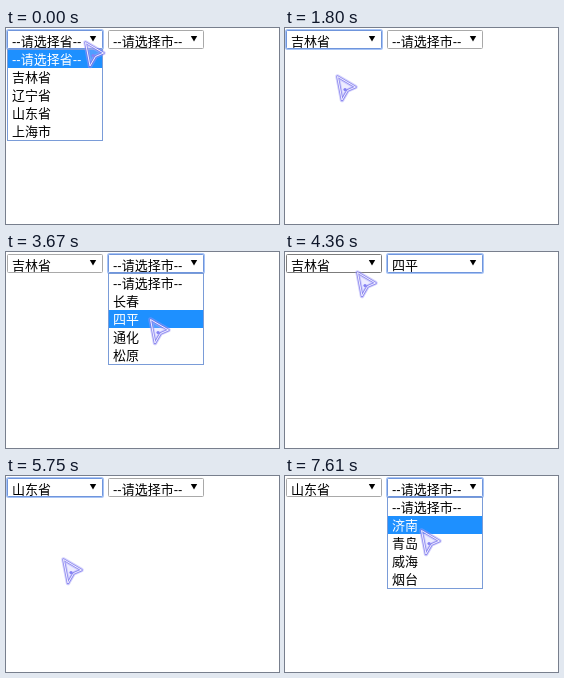
Animation of 273 by 196 pixels, one loop 7990 ms. Source, as an HTML page:

```html
<!DOCTYPE html>
<html lang="zh">
<head>
<meta charset="utf-8">
<style>
html, body { margin: 0; width: 100%; height: 100%; overflow: hidden; background: #fff; }
svg { display: block; width: 273px; height: 196px; }
text { font: 13px "Liberation Sans", "Noto Sans CJK SC", "Noto Sans CJK", sans-serif; white-space: pre; }
</style>
</head>
<body>
<svg viewBox="0 0 273 196">
  <defs><path id="arrow" d="M0 0L18 10.500L10 14L4.500 23.500Z"/></defs>
  <g id="ui"></g>
  <g id="cursor" fill="none" stroke-linejoin="round">
    <use href="#arrow" stroke="#a5a0f8" stroke-width="4.500" opacity=".45"/>
    <use href="#arrow" fill="#c4c0ff" fill-opacity=".3" stroke="#716cea" stroke-width="2.600" stroke-opacity=".7"/>
    <use href="#arrow" stroke="#f2f0ff" stroke-width="1"/>
    <circle cx="7.500" cy="13" r="1.600" fill="#8480f4"/>
  </g>
</svg>
<script>
const LOOP = 7990, STEP = 76.7, ROW = 18, LIST_TOP = 22, LEFT = [1, 102];
const provinces = ['--请选择省--', '吉林省', '辽宁省', '山东省', '上海市'];
const towns = { 吉林省: ['长春', '四平', '通化', '松原'], 山东省: ['济南', '青岛', '威海', '烟台'] };
const citiesOf = prov => ['--请选择市--', ...(towns[provinces[prov]] || [])];

// Each move eases the pointer to a new place in a few steps
const home = { x: 79, y: 14 };
const moves = [
  { at: 70, x: 51, y: 77, steps: 8 },
  { at: 1190, x: 52, y: 48, steps: 4 },
  { at: 2040, x: 144, y: 18, steps: 8 },
  { at: 2960, x: 144, y: 67, steps: 10 },
  { at: 3970, x: 66, y: 16, steps: 7 },
  { at: 4830, x: 63, y: 49, steps: 3 },
  { at: 5050, x: 57, y: 83, steps: 4 },
  { at: 5750, x: 135, y: 15, steps: 9 },
  { at: 6440, x: 137, y: 13, steps: 3 },
  { at: 7210, x: 136, y: 54, steps: 4 }
];
const clicks = [1800, 2660, 3970, 4600, 5750, 6830];

const ui = document.getElementById('ui');
const cursor = document.getElementById('cursor');
const ease = u => u * u * (3 - 2 * u);
const rowAt = y => Math.floor((y - LIST_TOP) / ROW);

function tipAt(t) {
  let { x, y } = home;
  for (const m of moves) {
    if (t < m.at) break;
    const k = Math.floor((t - m.at) / STEP + 0.2);
    const e = ease(Math.min(1, k / (m.steps - 1)));
    x += (m.x - x) * e;
    y += (m.y - y) * e;
  }
  return { x: Math.round(x), y: Math.round(y) };
}

// A click opens the box under the pointer, or picks a row of the open list
function stateAt(t) {
  const s = { picked: [0, 0], focus: 0, open: true };
  for (const at of clicks.filter(c => c <= t)) {
    const tip = tipAt(at);
    if (s.open) {
      s.picked[s.focus] = rowAt(tip.y);
      if (s.focus === 0) s.picked[1] = 0;
    } else {
      s.focus = tip.x < LEFT[1] ? 0 : 1;
    }
    s.open = !s.open;
  }
  return s;
}

const label = (x, y, s, fill = '#000') => `<text x="${x}" y="${y}" fill="${fill}">${s}</text>`;
const box = (x, y, w, h, attrs) => `<rect x="${x}" y="${y}" width="${w}" height="${h}" ${attrs}/>`;

function selectBox(x, s, focused, hover) {
  const edge = focused ? '#6f95dc' : hover ? '#7c7c7c' : '#a9a9a9';
  const ring = focused ? box(x, 2, 96, 19, 'rx="1.500" fill="none" stroke="#a8c4f5" stroke-width="2"') : '';
  return ring + box(x + 0.5, 2.5, 95, 18, `rx="1" fill="#fff" stroke="${edge}"`) +
    label(x + 5, 18, s) + `<path d="M${x + 82.8} 8h6.400l-3.200 5.500z"/>`;
}

function listBox(x, items, active) {
  return box(x + 0.5, 21.5, 95, 91, 'fill="#fff" stroke="#7a9cd8"') +
    items.map((s, i) => {
      const y = LIST_TOP + i * ROW, on = i === active;
      return (on ? box(x + 1, y, 94, ROW, 'fill="#1e90ff"') : '') +
        label(x + 5, y + 14, s, on ? '#fff' : '#000');
    }).join('');
}

function draw(t) {
  const { x, y } = tipAt(t);
  const { picked, focus, open } = stateAt(t);
  const lists = [provinces, citiesOf(picked[0])];
  let out = LEFT.map((left, i) => {
    const hover = y < 21 && x >= left && x < left + 96;
    return selectBox(left, lists[i][picked[i]], focus === i, hover);
  }).join('');
  if (open) out += listBox(LEFT[focus], lists[focus], y < LIST_TOP ? picked[focus] : rowAt(y));
  ui.innerHTML = out;
  cursor.setAttribute('transform', `translate(${x + 0.5} ${y + 0.5})`);
}

const begin = performance.now();
function tick() {
  draw((performance.now() - begin) % LOOP);
  requestAnimationFrame(tick);
}
tick();
</script>
</body>
</html>
```
